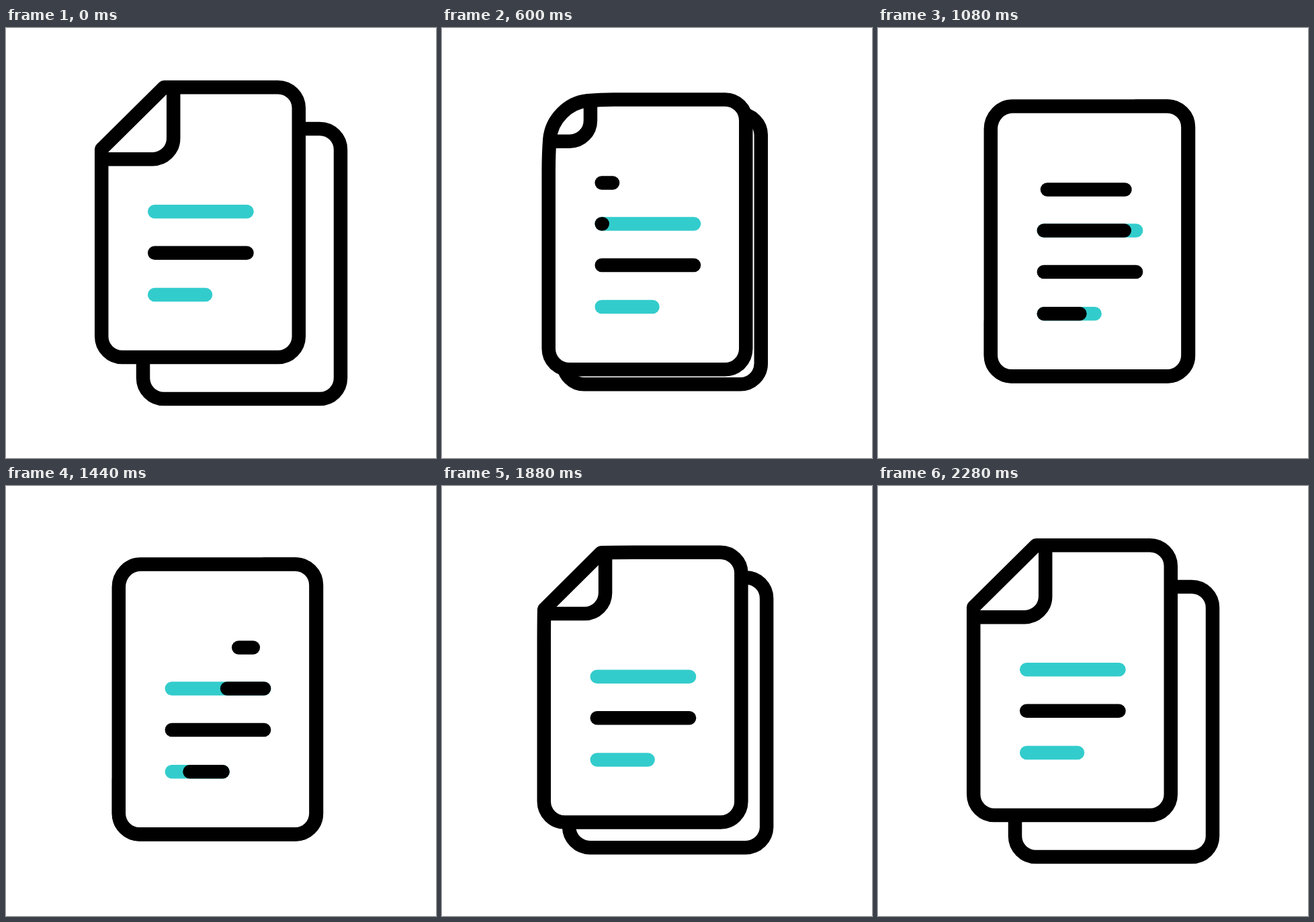
These frames come from a looping animation (640x640 px, 2.48 s). An HTML page:

```html
<!DOCTYPE html>
<html lang="en">
<head>
<meta charset="utf-8">
<title>Copy documents</title>
<style>
  html, body { margin: 0; width: 100%; height: 100%; overflow: hidden; background: #fff; }
  svg { display: block; width: 100%; height: 100%; }
  path { fill: none; stroke: #000; stroke-width: 20.5; stroke-linecap: round; stroke-linejoin: round; }
  #sheet { fill: #fff; }
  .teal { stroke: #33cccc; }
</style>
</head>
<body>
<svg viewBox="0 0 640 640">
  <path id="back" d="M420 150H467a31 31 0 0 1 31 31V521a31 31 0 0 1-31 31H235a31 31 0 0 1-31-31V470"/>
  <g id="front">
    <path id="sheet"/>
    <path id="fold"/>
    <path class="teal" d="M221.2 273.3H358.5"/>
    <path d="M221.2 334.8H358.5"/>
    <path class="teal" d="M221.2 396.9H297"/>
  </g>
</svg>
<script>
const LOOP = 2480, STEP = 40;
const LEFT = 142.2, TOP = 88.2, RIGHT = 435.8, BOTTOM = 490;
const LINE_X = 221.2;
const $ = id => document.getElementById(id);
const clamp = v => Math.min(1, Math.max(0, v));
const mix = (a, b, k) => a + (b - a) * k;

const smooth = (t, from, to) => {
  const s = clamp((t - from) / (to - from));
  return s * s * (3 - 2 * s);
};

// cubic-bezier(x1, 0, x2, 1) between two times
function ease(t, from, to, x1 = 0.5, x2 = 0.2) {
  const s = clamp((t - from) / (to - from));
  let lo = 0, hi = 1;
  for (let i = 0; i < 24; i++) {
    const u = (lo + hi) / 2, v = 1 - u;
    if (3 * u * v * v * x1 + 3 * u * u * v * x2 + u * u * u < s) lo = u; else hi = u;
  }
  return lo * lo * (3 - 2 * lo);
}

// black strokes that run along the text lines: drawn, then erased from the left
const runners = [
  { y: 212.2, length: 121, draw: [450, 1100], erase: [1006, 1600] },
  { y: 273.3, length: 137.3, draw: [567, 1227], erase: [1100, 1700] },
  { y: 396.9, length: 75.8, draw: [695, 1295], erase: [1200, 1800] }
];
for (const r of runners) {
  r.el = document.createElementNS("http://www.w3.org/2000/svg", "path");
  $("front").append(r.el);
}

function sheetPath(open, round) {
  const inset = 3 * (1 - open) * Math.min(1, open * 20);
  const ax = LEFT + inset, ay = TOP + mix(34, 92, open);
  const bx = LEFT + mix(32.5, 93, open), by = TOP + inset;
  const w = bx - ax, h = ay - by;
  const c1 = [ax + mix(w / 3, 0, round), ay - h * mix(1 / 3, 0.55, round)];
  const c2 = [bx - w * mix(1 / 3, 0.55, round), by + mix(h / 3, 0, round)];
  return `M${ax} ${ay}C${c1} ${c2} ${bx} ${by}` +
    `Q${bx + 22} ${TOP} ${bx + 48} ${TOP}H${RIGHT - 31}a31 31 0 0 1 31 31` +
    `V${BOTTOM - 31}a31 31 0 0 1-31 31H${LEFT + 31}a31 31 0 0 1-31-31` +
    `V${ay + 48}Q${LEFT} ${ay + 22} ${ax} ${ay}Z`;
}

function foldPath(open) {
  if (open < 0.12) return "";
  const size = 107 * (0.42 + 0.38 * open + 0.2 * open ** 5) * Math.min(1, open / 0.3);
  const r = Math.min(31, size / 2);
  return `M${LEFT + size} ${TOP + 4}V${TOP + size - r}a${r} ${r} 0 0 1 ${-r} ${r}H${LEFT + 4}`;
}

function render(t) {
  const joined = ease(t, 280, 1000);
  const near = joined - ease(t, 1570, 2280);
  const far = joined - ease(t, 1560, 2280, 0.6, 0.18);
  $("front").setAttribute("transform", `translate(${25.6 * near} ${28.3 * near})`);
  $("back").setAttribute("transform", `translate(${-36 * far} ${-33.6 * far})`);

  const open = 1 - ease(t, 385, 900) + ease(t, 1503, 2123);
  const round = smooth(t, 360, 680) - smooth(t, 1480, 1700);
  $("sheet").setAttribute("d", sheetPath(open, round));
  $("fold").setAttribute("d", foldPath(open));

  for (const r of runners) {
    const start = smooth(t, ...r.erase), end = smooth(t, ...r.draw);
    r.el.setAttribute("d", end - start > 0.001
      ? `M${LINE_X + r.length * start} ${r.y}H${LINE_X + r.length * end}` : "");
  }
}

const begin = performance.now();
function tick() {
  const t = (performance.now() - begin) % LOOP;
  render(Math.floor(t / STEP) * STEP);
  requestAnimationFrame(tick);
}
tick();
</script>
</body>
</html>
```
